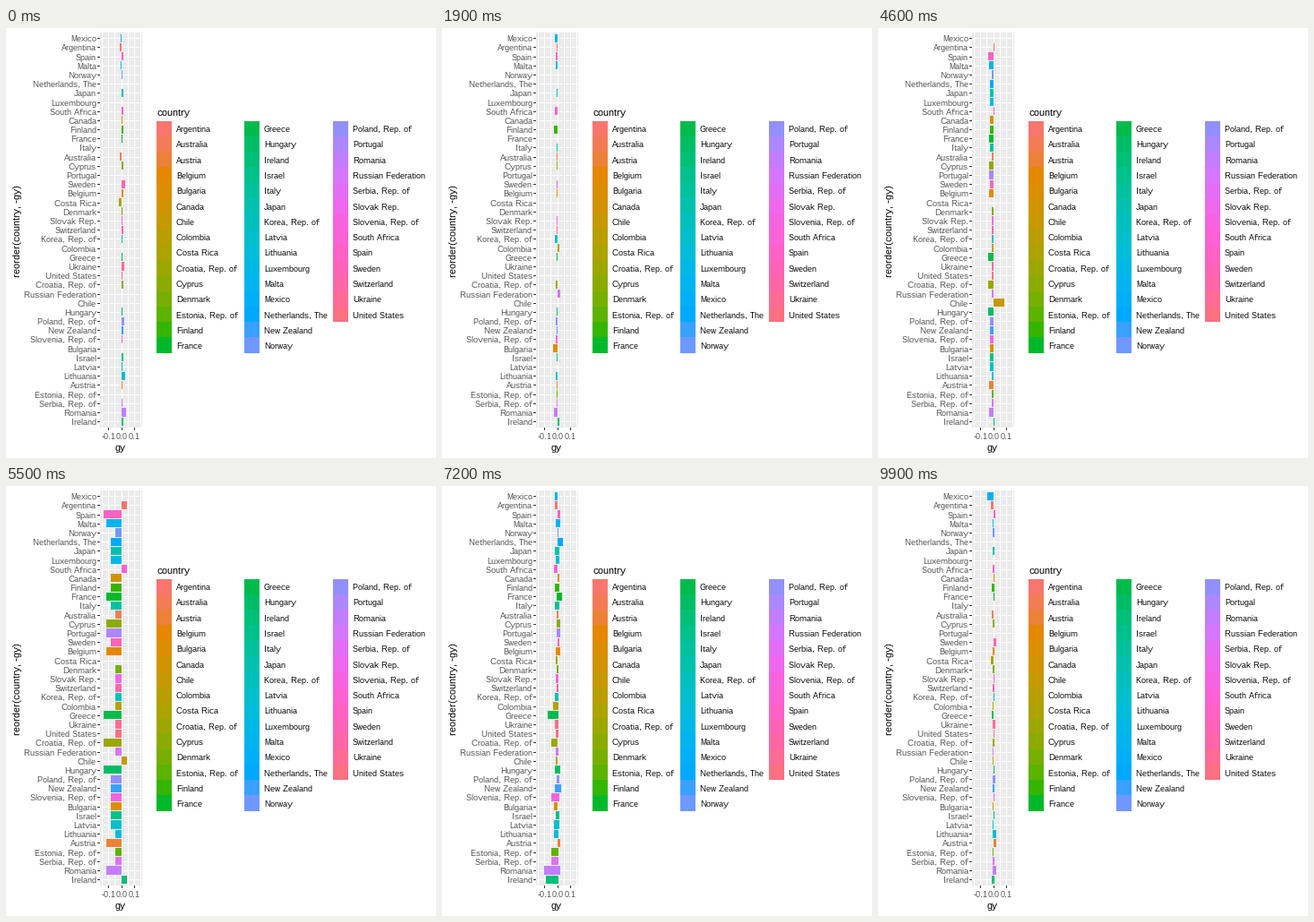
Recreate the animation shown at these times as a matplotlib script. Size 480 px wide and 480 px high, loop 10 s.

```python
import numpy as np
import matplotlib.pyplot as plt
from matplotlib.animation import FuncAnimation
from matplotlib.patches import Rectangle

plt.rcParams.update({"font.family": "Liberation Sans",
                     "text.hinting": "no_autohint", "text.hinting_factor": 1})
SIZE, DPI = 480, 72
ZERO, TENTH = 129.1, 14.4            # pixel of 0.0 and pixels per 0.1
TOP, STEP = 11.7, 10.19              # first row centre and row spacing
LEFT, RIGHT, PANEL_TOP, PANEL_BOTTOM = 105, 152, 5, 446
KEY = 17.28                          # legend key size
GREY = "#4D4D4D"

COUNTRIES = """Mexico|Argentina|Spain|Malta|Norway|Netherlands, The|Japan|Luxembourg
South Africa|Canada|Finland|France|Italy|Australia|Cyprus|Portugal|Sweden|Belgium
Costa Rica|Denmark|Slovak Rep.|Switzerland|Korea, Rep. of|Colombia|Greece|Ukraine
United States|Croatia, Rep. of|Russian Federation|Chile|Hungary|Poland, Rep. of
New Zealand|Slovenia, Rep. of|Bulgaria|Israel|Latvia|Lithuania|Austria
Estonia, Rep. of|Serbia, Rep. of|Romania|Ireland""".replace("\n", "|").split("|")
N = len(COUNTRIES)
ROW = {name.split()[0].strip(","): i for i, name in enumerate(COUNTRIES)}
rng = np.random.default_rng(4)


def quarter(base, spread=0.0, **outliers):
    """Signed bar lengths in pixels: noise around a base, with a few outliers."""
    lengths = base + spread * rng.uniform(-1, 1, N)
    for name, length in outliers.items():
        lengths[ROW[name]] = length
    return lengths


calm = quarter(1, 1.5, Mexico=-1, Argentina=-2, Australia=-2, Costa=-3, Sweden=4,
               Ukraine=3, Poland=3, Lithuania=4, Romania=5, Ireland=2)
dip = quarter(-0.5, 1.2, Mexico=-3, South=-3, Finland=-4, Korea=-3, Colombia=2,
              Russian=3, Bulgaria=-5, Romania=-4, Ireland=2)
mixed = quarter(0.3, 1.5, Mexico=-3, Argentina=-5, Norway=3, Japan=-4, Chile=-10,
                Slovenia=3, Bulgaria=3, Romania=2)

# The slump comes in tiers; the rebound gives back a share of it.
slump = quarter(-12)
TIERS = {-20: "Spain Greece Croatia Hungary",
         -17: "Malta France Cyprus Portugal Belgium Austria Romania",
         -7: "Norway Australia Denmark Slovak Switzerland Korea Colombia Ukraine "
             "United Russian Lithuania Estonia Serbia",
         0: "Mexico Costa",
         6: "Argentina South Chile Ireland"}
for depth, names in TIERS.items():
    slump[[ROW[name] for name in names.split()]] = depth
onset = 0.3 * slump
onset[ROW["Chile"]] = 12
rebound = -0.7 * slump
for name, length in dict(Mexico=-3, France=20, New=18, Greece=5, Croatia=1,
                         Bulgaria=1, Chile=3, Ireland=5).items():
    rebound[ROW[name]] = length

rise = quarter(1.5, 1.8, Mexico=2, Netherlands=-5, Colombia=6, Greece=14, Croatia=9,
               Slovenia=9, Bulgaria=5, Latvia=5, Lithuania=5, Estonia=9, Serbia=8,
               Romania=18, Ireland=16)
pause = -1.05 * rise
pause[ROW["Mexico"]] = rebound[ROW["Mexico"]]
late = quarter(-1, 3, Mexico=-22, Finland=-7, Greece=-8, Austria=9, Romania=-4,
               Ireland=-5)

STATES = [calm, (calm + dip) / 2, dip, (dip + mixed) / 2, mixed, onset, slump,
          rebound, pause, rise, late, calm]
STARTS = [5, 15] + [25 + 9 * k for k in range(9)]
STEPS = [5, 5] + [4] * 9


def hcl(hue, chroma=100, light=65):
    """Polar LUV colour as clipped sRGB."""
    angle = np.radians(hue)
    u = chroma * np.cos(angle) / (13 * light) + 0.19784
    v = chroma * np.sin(angle) / (13 * light) + 0.46834
    y = ((light + 16) / 116) ** 3
    xyz = np.array([y * 9 * u / (4 * v), y, y * (12 - 3 * u - 20 * v) / (4 * v)])
    rgb = np.array([[3.2405, -1.5371, -0.4985],
                    [-0.9693, 1.8760, 0.0416],
                    [0.0556, -0.2040, 1.0572]]) @ xyz
    rgb = np.clip(rgb, 0, 1)
    return tuple(np.where(rgb > 0.0031308, 1.055 * rgb ** (1 / 2.4) - 0.055, 12.92 * rgb))


COLORS = {name: hcl(15 + 360 * i / N) for i, name in enumerate(sorted(COUNTRIES))}

fig = plt.figure(figsize=(SIZE / DPI, SIZE / DPI), dpi=DPI, facecolor="white")
ax = fig.add_axes([0, 0, 1, 1])
ax.set(xlim=(0, SIZE), ylim=(SIZE, 0))
ax.axis("off")


def box(x0, y0, x1, y1, color, z=1):
    """Rectangle whose edges are cut down to whole pixels."""
    x0, y0, x1, y1 = (int(c) for c in (x0, y0, x1, y1))
    return ax.add_patch(Rectangle((x0, y0), x1 - x0, y1 - y0, facecolor=color, linewidth=0,
                                  zorder=z, antialiased=False, snap=False))


def label(x, y, text, size=9, color="black", ha="left", **kw):
    ax.text(x, int(y), text, fontsize=size, color=color, ha=ha, va="baseline", **kw)


# Panel, grid and axes
box(LEFT, PANEL_TOP, RIGHT, PANEL_BOTTOM, "#EBEBEB")
for k in range(-3, 4):
    x = int(ZERO + k * TENTH / 2)
    box(x, PANEL_TOP, x + 1, PANEL_BOTTOM, "white", 2)
    if k in (-2, 0, 2):
        box(x, PANEL_BOTTOM, x + 1, PANEL_BOTTOM + 3, "#333333")
        label(x + 0.5, 459, f"{k / 20:.1f}", color=GREY, ha="center")

bars = []
for i, name in enumerate(COUNTRIES):
    y = TOP + i * STEP
    box(LEFT, y, RIGHT, y + 1, "white", 2)
    box(LEFT - 3, y, LEFT, y + 1, "#333333")
    label(101, y + 4, name, color=GREY, ha="right")
    bars.append(box(ZERO, y - 0.45 * STEP, ZERO, y + 0.45 * STEP, COLORS[name], 3))

label(128, 472, "gy", 11, ha="center")
label(16, 226, "reorder(country, -gy)", 11, ha="center", rotation=90,
      rotation_mode="anchor")

# Legend
label(168, 98, "country", 11)
for i, name in enumerate(sorted(COUNTRIES)):
    col, row = divmod(i, 15)
    x, y = int(168 + 98.5 * col), 104 + KEY * row
    box(x, y, x + 17, y + KEY, COLORS[name])
    label(x + 22, y + KEY / 2 + 4, name)


def update(n):
    k = max([j for j, start in enumerate(STARTS) if n >= start], default=0)
    p = np.clip((n - STARTS[k] + 1) / STEPS[k], 0, 1)
    a, b = STATES[k], STATES[k + 1]
    # Both ends move separately, so a bar changing sign straddles zero.
    low = (1 - p) * np.minimum(a, 0) + p * np.minimum(b, 0)
    high = (1 - p) * np.maximum(a, 0) + p * np.maximum(b, 0)
    for bar, lo, hi in zip(bars, low, high):
        x0, x1 = int(ZERO + lo), int(ZERO + hi)
        bar.set_x(x0)
        bar.set_width(x1 - x0)
    return bars


anim = FuncAnimation(fig, update, frames=100, interval=100, repeat=True,
                     repeat_delay=0, init_func=lambda: update(0), blit=False)
plt.show()
```
